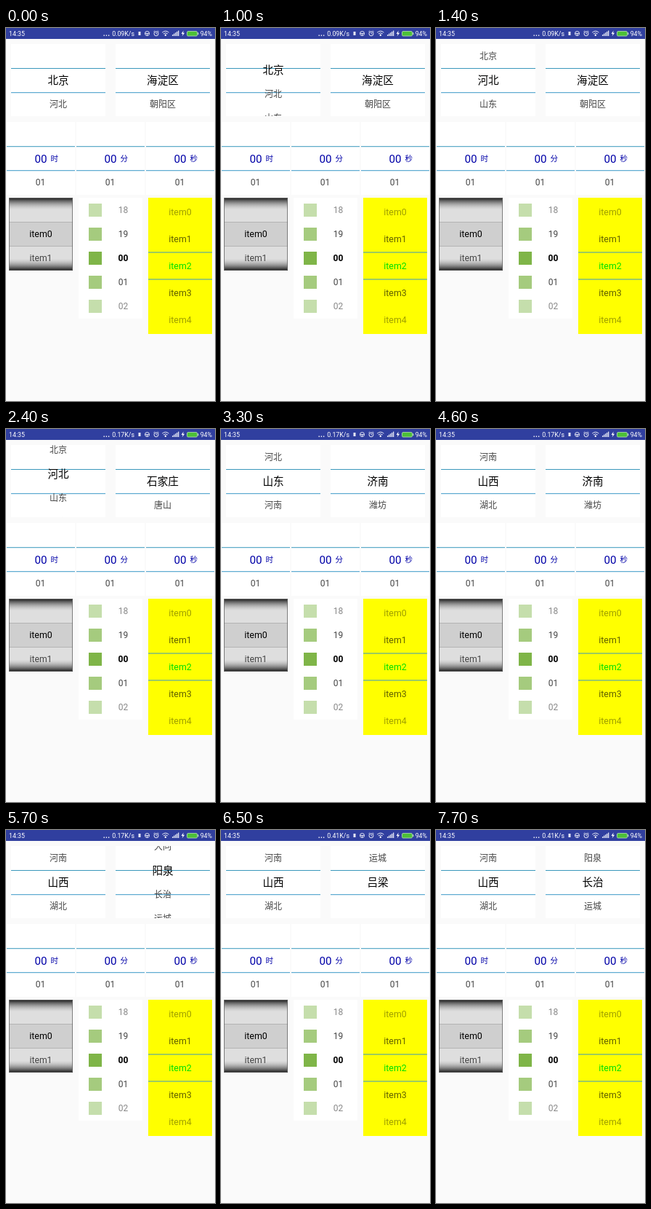
An HTML page for the animation above (8000 ms loop, 288 by 512 pixels).

```html
<!DOCTYPE html>
<html lang="zh-CN">
<head>
<meta charset="utf-8">
<title>Wheel pickers</title>
<style>
html, body { margin: 0; width: 100%; height: 100%; overflow: hidden; background: #fafafa; }
svg { display: block; width: 288px; height: 512px; }
text { font-family: Roboto, "Noto Sans CJK SC", "Noto Sans CJK", sans-serif; }
</style>
</head>
<body>
<svg id="stage" viewBox="0 0 288 512" xmlns="http://www.w3.org/2000/svg">
  <defs>
    <linearGradient id="shade" x1="0" y1="0" x2="0" y2="1">
      <stop offset="0" stop-color="#111"/>
      <stop offset=".165" stop-color="#aaa" stop-opacity="0"/>
      <stop offset=".835" stop-color="#aaa" stop-opacity="0"/>
      <stop offset="1" stop-color="#111"/>
    </linearGradient>
    <clipPath id="wheelClip"><rect y="22" width="288" height="99"/></clipPath>
  </defs>
</svg>
<script>
const NS = 'http://www.w3.org/2000/svg';
const stage = document.getElementById('stage');

function add(tag, attrs, parent = stage) {
  const el = document.createElementNS(NS, tag);
  for (const k in attrs) el.setAttribute(k, attrs[k]);
  return parent.appendChild(el);
}
function box(x, y, width, height, fill, opacity = 1) {
  return add('rect', { x, y, width, height, fill, opacity });
}
// y is the vertical middle of the glyphs
function label(str, x, y, size, fill, more = {}, parent = stage) {
  const shift = /[\u4e00-\u9fff]/.test(str) ? 0.38 : 0.356;
  const el = add('text', { x, y: y + size * shift, 'font-size': size, fill, 'text-anchor': 'middle', ...more }, parent);
  el.textContent = str;
  return el;
}
function rules(x, y1, y2, width) {
  box(x, y1, width, 1, '#3a98bc');
  box(x, y2, width, 1, '#3a98c8');
}
function line(d, width = 1) {
  add('path', { d, fill: 'none', stroke: '#e8eaf6', 'stroke-width': width });
}

function statusBar() {
  box(0, 0, 288, 15, '#303f9f');
  label('14:35', 4, 7.7, 8.8, '#fff', { 'text-anchor': 'start' });
  for (let i = 0; i < 3; i++) box(134.5 + i * 3.2, 9.5, 1.4, 1.4, '#fff');
  box(182.5, 5, 3, 5, '#e8eaf6');
  add('circle', { cx: 194.5, cy: 7.5, r: 3, fill: 'none', stroke: '#e8eaf6' });
  line('M191.5 7.5h6M194.5 7.5v3', 0.9);
  add('circle', { cx: 207, cy: 7.8, r: 3, fill: 'none', stroke: '#e8eaf6' });
  line('M207 6v2h1.5M203.4 5.2l1.8-1.6M210.6 5.2l-1.8-1.6', 0.8);
  line('M215.2 6.2Q219.8 2.2 224.4 6.2M216.8 8Q219.8 5.4 222.8 8');
  add('circle', { cx: 219.8, cy: 9.8, r: 1.2, fill: '#fff' });
  for (let i = 0; i < 5; i++) box(229 + i * 2, 9 - i * 1.35, 1.3, 2 + i * 1.35, '#e8eaf6');
  add('path', { d: 'M244.6 3.6l-3 4.4h2l-.9 3.2 3.4-4.5h-2.1z', fill: '#fff' });
  add('rect', { x: 249.5, y: 4.5, width: 14, height: 6.5, rx: 1.5, fill: '#4cc038', stroke: '#b4dcb4', 'stroke-width': 0.8 });
  box(264.2, 6.3, 1.3, 3, '#b4dcb4');
  label('94%', 284, 7.7, 8.8, '#fff', { 'text-anchor': 'end' });
  return label('0.09K/s', 177, 7.7, 8.8, '#fff', { 'text-anchor': 'end' });
}

function timeRow() {
  ['时', '分', '秒'].forEach((unit, i) => {
    const x = 1 + i * 96;
    box(x, 129, 94, 100, '#fff');
    rules(x, 162.2, 195.2, 94);
    label('00', x + 47, 179.5, 15.2, '#0000a8');
    label(unit, x + 65.7, 179.5, 10.5, '#0000a8');
    label('01', x + 46.5, 212, 12, '#444');
  });
}

function greyWheel() {
  box(4, 233, 88, 100, '#dedede');
  box(4, 233, 88, 100, 'url(#shade)');
  box(4, 266, 88, 34, '#cfcfcf');
  box(4, 266, 88, 1, '#b4b4b4');
  box(4, 299, 88, 1, '#b4b4b4');
  add('rect', { x: 4.5, y: 233.5, width: 87, height: 99, fill: 'none', stroke: '#666', 'stroke-width': 0.8 });
  label('item0', 48, 282.5, 12.4, '#000');
  label('item1', 48, 315.5, 12.2, '#444');
}

function iconWheel() {
  box(100, 233, 88, 166, '#fff');
  ['18', '19', '00', '01', '02'].forEach((str, i) => {
    const y = 250 + i * 33, away = Math.abs(i - 2);
    box(114, y - 9, 18, 18, '#7fb548', [1, 0.7, 0.45][away]);
    label(str, 161.5, y, 12, ['#000', '#444', '#888'][away], { 'font-weight': away ? 400 : 700 });
  });
}

function yellowWheel() {
  box(196, 233, 88, 187, '#ff0');
  rules(196, 307.5, 344.5, 88);
  for (let i = 0; i < 5; i++) {
    const away = Math.abs(i - 2);
    label('item' + i, 240, 252.5 + i * 37, 12.4, ['#00e000', '#626200', '#a0a000'][away]);
  }
}

function cityWheel(x) {
  box(x, 22, 130, 99, '#fff');
  rules(x, 55, 88.2, 130);
  const g = add('g', { 'clip-path': 'url(#wheelClip)' });
  return (items, pos) => {
    g.textContent = '';
    items.forEach((name, i) => {
      const d = i - pos;
      if (Math.abs(d) > 2) return;
      const on = i === Math.round(pos);
      label(name, x + 65, 71.5 + d * 33, on ? 14.6 : 12, on ? '#000' : '#444', {}, g);
    });
  };
}

const provinces = ['北京', '河北', '山东', '河南', '山西', '湖北'];
const cities = [
  [0, ['海淀区', '朝阳区']],
  [1900, ['石家庄', '唐山']],
  [3300, ['济南', '潍坊']],
  [4800, ['太原', '大同', '阳泉', '长治', '运城', '吕梁']]
];
const speeds = [[0, '0.09K/s'], [2400, '0.17K/s'], [6300, '0.41K/s']];

// [first step, last step, from, to, deceleration]
const leftMoves = [[900, 1400, 0, 1, 1.4], [2400, 2700, 1, 2, 1.25], [3800, 4600, 2, 4, 5.9]];
const rightMoves = [[5500, 6100, 0, 4, 1.74], [6300, 6500, 4, 5, 1.4], [7300, 7700, 5, 3, 1.5]];

const TICK = 100, LOOP = 8000;

function position(moves, t) {
  let pos = 0;
  for (const [start, end, from, to, power] of moves) {
    if (t < start) break;
    const p = Math.min(1, (t - start + TICK) / (end - start + TICK));
    pos = from + (to - from) * (1 - Math.pow(1 - p, power));
  }
  return pos;
}
const current = (list, t) => list.filter(e => e[0] <= t).pop()[1];

const speed = statusBar();
const drawLeft = cityWheel(7), drawRight = cityWheel(151);
timeRow();
greyWheel();
iconWheel();
yellowWheel();

function render(ms) {
  const t = Math.floor((ms % LOOP) / TICK) * TICK;
  speed.textContent = current(speeds, t);
  drawLeft(provinces, position(leftMoves, t));
  drawRight(current(cities, t), position(rightMoves, t));
}

const begin = performance.now();
function frame() {
  render(performance.now() - begin);
  requestAnimationFrame(frame);
}
frame();
</script>
</body>
</html>
```
